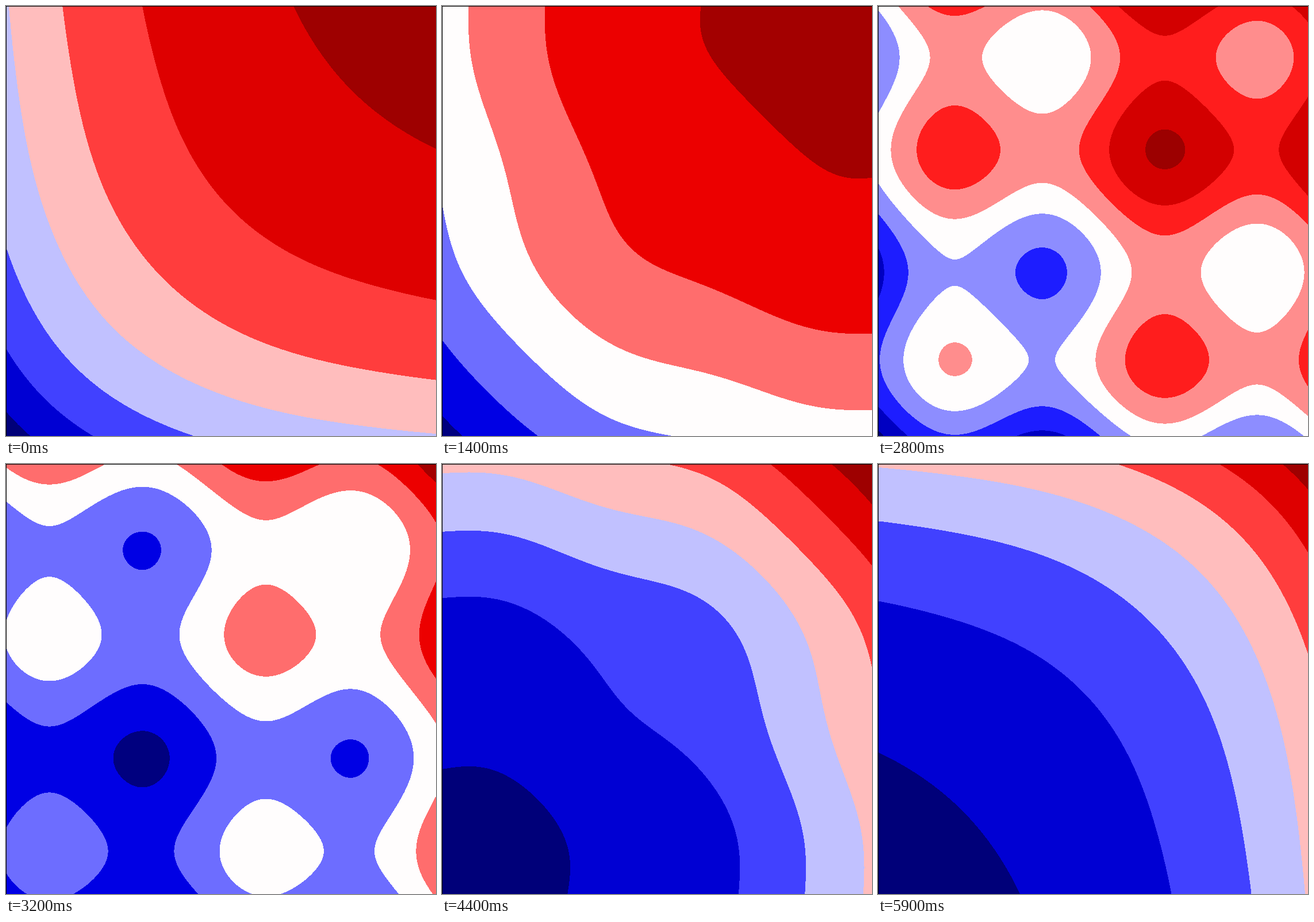
An HTML page with a canvas for the animation above (6000 ms loop, 748 px wide and 748 px high).

```html
<!DOCTYPE html>
<html lang="en">
<head>
<meta charset="utf-8">
<title>Contours</title>
<style>
  html, body { margin: 0; width: 100%; height: 100%; overflow: hidden; background: #fff; }
  canvas { display: block; width: 748px; height: 748px; }
</style>
</head>
<body>
<canvas id="stage" width="748" height="748"></canvas>
<script>
const SIZE = 748, FRAMES = 60, FRAME_MS = 100;
const T_START = -6.28, T_END = 2 * Math.PI;
const NICE_STEPS = [1, 1.5, 2, 2.5, 3, 4, 5, 6, 8, 10];
const STOPS = [[0, 0, 0.3], [0, 0, 1], [1, 1, 1], [1, 0, 0], [0.5, 0, 0]];

const ctx = document.getElementById('stage').getContext('2d');
const image = ctx.createImageData(SIZE, SIZE);
const pixels = new Uint32Array(image.data.buffer);

const pack = ([r, g, b]) => (0xff000000 | b << 16 | g << 8 | r) >>> 0;
const BLACK = pack([0, 0, 0]);

// Diverging blue-white-red map, quantised to 256 entries.
function mapColor(v) {
  const pos = Math.min(255, Math.floor(v * 256)) / 255 * 4;
  const i = Math.min(3, Math.floor(pos));
  return pack(STOPS[i].map((c, k) => Math.round(255 * (c + (STOPS[i + 1][k] - c) * (pos - i)))));
}

// Smallest round interval that splits the range into at most eight parts.
function niceStep(range) {
  const raw = range / 8;
  const scale = 10 ** Math.floor(Math.log10(raw));
  return scale * NICE_STEPS.find(s => s * scale >= raw);
}

// The surface is z(x, y) = wave(x) + wave(y).
const wave = (x, t) => Math.sinh(x / 5 + t) + Math.sin(x + t);

function draw(frame) {
  const t = T_START + (T_END - T_START) * frame / (FRAMES - 1);
  const values = Float64Array.from({ length: SIZE + 1 },
    (_, i) => wave((2 * i / SIZE - 1) * 2 * Math.PI, t));
  const min = 2 * Math.min(...values), max = 2 * Math.max(...values);
  const step = niceStep(max - min);
  const low = Math.floor(min / step);
  const count = Math.ceil(max / step) - low;
  const colors = Array.from({ length: count }, (_, i) => mapColor((i + 0.5) / count));

  for (let py = 0, n = 0; py < SIZE; py++) {
    const vy = values[SIZE - py];
    for (let px = 0; px < SIZE; px++, n++) {
      const band = Math.floor((values[px] + vy) / step) - low;
      pixels[n] = px && py ? colors[Math.min(band, count - 1)] : BLACK;
    }
  }
  ctx.putImageData(image, 0, 0);
}

const start = performance.now();
let shown = -1;

function tick() {
  const frame = Math.floor((performance.now() - start) / FRAME_MS) % FRAMES;
  if (frame !== shown) draw(shown = frame);
  requestAnimationFrame(tick);
}
tick();
</script>
</body>
</html>
```
